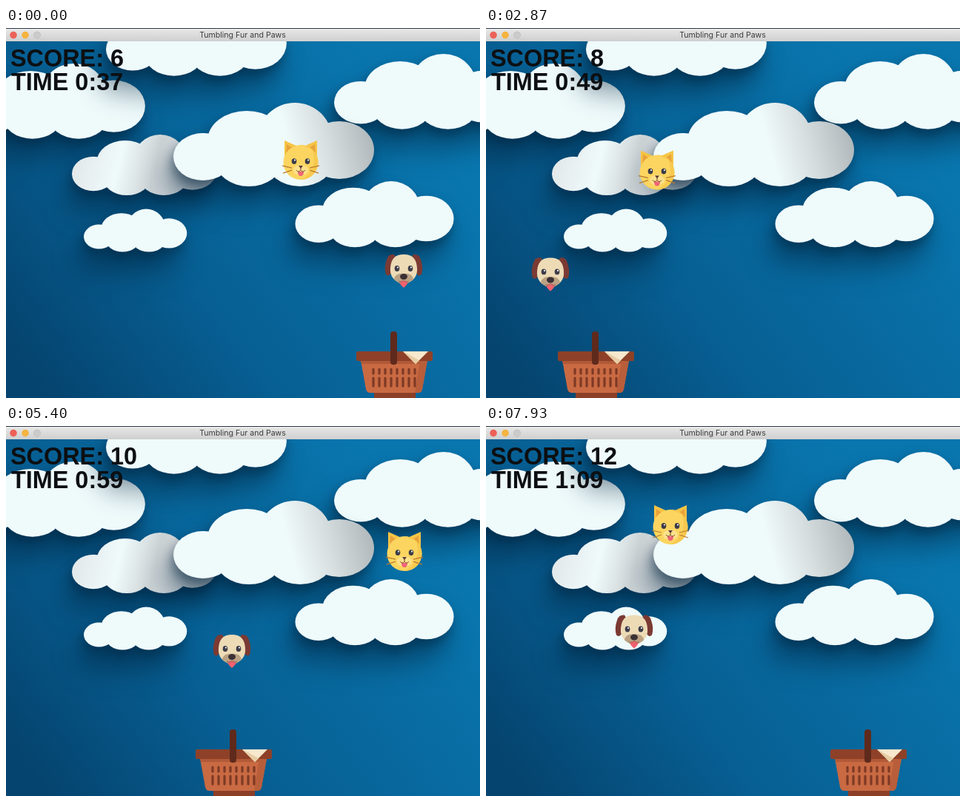
Recreate the animation shown at these times as an HTML page. Size 640 by 500 pixels, loop 8000 ms.

```html
<!DOCTYPE html>
<html lang="en">
<head>
<meta charset="utf-8">
<title>Tumbling Fur and Paws</title>
<style>
  html, body { margin: 0; width: 100%; height: 100%; overflow: hidden; background: #075689; }
  svg { display: block; width: 100vw; height: 100vh; }
  .hud { font: bold 32.4px "Liberation Sans", Arial, sans-serif; fill: #0d0f12; }
  .title { font: 10.6px Inter, Roboto, sans-serif; fill: #3c3c3c; text-anchor: middle; }
</style>
</head>
<body>
<svg viewBox="0 0 640 500" preserveAspectRatio="none">
  <defs>
    <linearGradient id="sky" gradientUnits="userSpaceOnUse" x1="60" y1="500" x2="560" y2="130">
      <stop stop-color="#05446f"/>
      <stop offset=".4" stop-color="#075f93"/>
      <stop offset="1" stop-color="#0976ae"/>
    </linearGradient>
    <linearGradient id="bar" x2="0" y2="1">
      <stop stop-color="#e9e9e9"/>
      <stop offset="1" stop-color="#cfcfcf"/>
    </linearGradient>
    <linearGradient id="shadeBig" gradientUnits="userSpaceOnUse" x1="160" y1="72" x2="272" y2="42">
      <stop stop-color="#effafb"/>
      <stop offset=".45" stop-color="#d6dddf"/>
      <stop offset="1" stop-color="#adb5b8"/>
    </linearGradient>
    <linearGradient id="shadeMid" gradientUnits="userSpaceOnUse" x1="10" y1="40" x2="200" y2="85">
      <stop stop-color="#e3e9eb"/>
      <stop offset=".4" stop-color="#effafb"/>
      <stop offset=".75" stop-color="#cdd4d6"/>
      <stop offset="1" stop-color="#d6dcdf"/>
    </linearGradient>
    <filter id="shadow" filterUnits="userSpaceOnUse" x="-100" y="-100" width="840" height="700" color-interpolation-filters="sRGB">
      <feDropShadow dx="-3" dy="8" stdDeviation="7" flood-color="#00213a" flood-opacity=".45"/>
      <feDropShadow dx="-9" dy="26" stdDeviation="17" flood-color="#00213a" flood-opacity=".48"/>
    </filter>
    <g id="cloud">
      <ellipse cx="40" cy="73" rx="40" ry="32"/>
      <ellipse cx="99" cy="51" rx="53" ry="40"/>
      <ellipse cx="164" cy="49" rx="50" ry="49"/>
      <ellipse cx="224" cy="64" rx="47" ry="39"/>
      <ellipse cx="102" cy="79" rx="45" ry="34"/>
      <ellipse cx="171" cy="77" rx="46" ry="36"/>
    </g>
  </defs>

  <rect width="640" height="500" fill="url(#sky)"/>
  <g id="clouds"></g>

  <g id="basket">
    <path d="M-27 491H29V500H-27Z" fill="#8c3f27"/>
    <path d="M-45 449H45L38 488Q37 493 32 493H-32Q-37 493-38 488Z" fill="#c96a43"/>
    <path d="M-45 449H45L44 454H-44Z" fill="#b25a38"/>
    <path d="M35 449H45L38 488Q37 493 32 493H28Z" fill="#b85e3b"/>
    <path id="slots" stroke="#7e3a25" stroke-width="3.2" stroke-linecap="round"/>
    <rect x="-51" y="437" width="103" height="13" rx="2" fill="#8e4128"/>
    <path d="M12 437H46L29 454Z" fill="#f8e8cd"/>
    <path d="M12 437L29 454L34 449Z" fill="#e7cda4"/>
    <rect x="-5" y="410" width="9" height="45" rx="4" fill="#5f2a1c"/>
  </g>

  <g id="cat">
    <path d="M-22 5L-22-27L-4-19ZM22 5L22-27L4-19Z" fill="#f6c445"/>
    <path d="M-20-7L-19-22L-10-16ZM20-7L19-22L10-16Z" fill="#e9a23b"/>
    <circle cy="2.5" r="23.5" fill="#fbd55f"/>
    <path d="M0-21A23.5 23.5 0 0 1 0 26A31 31 0 0 0 15-15Z" fill="#f7c94f"/>
    <ellipse cy="13" rx="10" ry="7" fill="#fde08a"/>
    <g class="eyes"></g>
    <path d="M-3 7H3L0 11Z" fill="#5b3a32"/>
    <path d="M-4 15H4Q4 21 0 21T-4 15Z" fill="#ee6578"/>
    <path d="M0 10V13M-6 13Q-3 17 0 13Q3 17 6 13" fill="none" stroke="#73492f"/>
    <path d="M-12 10L-25 7M-12 13L-24 17M12 10L25 7M12 13L24 17" stroke="#b9792d" stroke-width="1.2"/>
  </g>

  <g id="dog">
    <path d="M-13-22Q-21-23-23-15Q-27-4-24 5Q-20 9-16 2L-10-17ZM13-22Q21-23 23-15Q27-4 24 5Q20 9 16 2L10-17Z" fill="#7b3a33"/>
    <path d="M0-22C13-22 17-15 18-4C19 7 14 14 0 19C-14 14-19 7-18-4C-17-15-13-22 0-22Z" fill="#eddbb6"/>
    <path d="M0 4C9 3 13 8 13 12Q7 17 0 18Q-7 17-13 12C-13 8-9 3 0 4Z" fill="#bba283"/>
    <path d="M-6 15Q0 11 6 15Q5 19 0 23Q-5 19-6 15Z" fill="#f2616e"/>
    <path d="M-7 14Q-3 17 0 13Q3 17 7 14" fill="none" stroke="#8b7159"/>
    <g class="eyes" transform="translate(0 -4)"></g>
    <ellipse cy="8" rx="5" ry="4" fill="#3b3034"/>
  </g>

  <text id="score" class="hud" x="6" y="52"></text>
  <text id="clock" class="hud" x="7" y="84"></text>

  <rect width="640" height="18" fill="url(#bar)"/>
  <rect width="640" height="1" fill="#30384a"/>
  <circle cx="10" cy="9.6" r="4.8" fill="#ec6158"/>
  <circle cx="26" cy="9.6" r="4.8" fill="#f4b440"/>
  <circle cx="42" cy="9.6" r="4.6" fill="#cbcbcb" stroke="#b8b8b8" stroke-width=".6"/>
  <text class="title" x="319.5" y="13.3">Tumbling Fur and Paws</text>
</svg>

<script>
const LOOP = 8000, STEP = 1000 / 15;
const FALL_SPEED = .116, BASKET_SPEED = .24; // px per ms
const CATCH_Y = 385;
const byId = id => document.getElementById(id);

// x, y, scale, fill
const clouds = [
  [-56, 48, .9], [135, -37, .9], [443, 35, .9],
  [89, 144, .726, "url(#shadeMid)"], [226, 101, 1, "url(#shadeBig)"],
  [390.5, 207, .79], [105, 244.5, .514]
];
byId("clouds").innerHTML = clouds.map(([x, y, scale, fill = "#effafb"]) =>
  `<g filter="url(#shadow)"><use href="#cloud" fill="${fill}" transform="translate(${x} ${y}) scale(${scale})"/></g>`
).join("");

byId("slots").setAttribute("d", Array.from({ length: 8 }, (_, i) =>
  `M${i * 8 - 28} 461v6m0 6v11`).join(""));

for (const eyes of document.querySelectorAll(".eyes")) {
  eyes.innerHTML = [-9, 9].map(x =>
    `<ellipse cx="${x}" cy="1" rx="3.3" ry="3.9" fill="#3d3c49"/><circle cx="${x + 1}" cy="-.5" r="1.1" fill="#fff"/>`
  ).join("");
}

// Every animal falls down its lane and is replaced by the next once caught
const drops = {
  dog: [{ x: 537, caught: 491 }, { x: 87, caught: 3320 }, { x: 305, caught: 6098 }, { x: 200, caught: 8860 }],
  cat: [{ x: 398, caught: 1775 }, { x: 231, caught: 4525 }, { x: 538, caught: 7253 }, { x: 249, caught: 10097 }]
};
const allDrops = Object.values(drops).flat();

// The basket sets off at these times and glides to its next stop
const basketMoves = [
  { at: 491, to: 452 }, { at: 1600, to: 88 }, { at: 3390, to: 138 },
  { at: 4330, to: 307 }, { at: 6098, to: 554 }, { at: 7775, to: 200 }
];

function basketX(t) {
  return basketMoves.reduce((x, { at, to }) => {
    const reach = Math.max(0, t - at) * BASKET_SPEED;
    return x + Math.max(-reach, Math.min(reach, to - x));
  }, 524);
}

function place(id, x, y) {
  byId(id).setAttribute("transform", `translate(${x.toFixed(1)} ${y.toFixed(1)})`);
}

function draw(t) {
  for (const id in drops) {
    const { x, caught } = drops[id].find(d => t < d.caught);
    place(id, x, CATCH_Y - FALL_SPEED * (caught - t));
  }
  place("basket", basketX(t), 0);

  const seconds = Math.floor(37.7 + t / 247);
  byId("score").textContent = "SCORE: " + (6 + allDrops.filter(d => d.caught <= t).length);
  byId("clock").textContent =
    `TIME ${Math.floor(seconds / 60)}:${String(seconds % 60).padStart(2, "0")}`;
}

const start = performance.now();
function tick() {
  const t = Math.max(0, performance.now() - start) % LOOP;
  draw(Math.min(119, Math.floor((t + 4) / STEP)) * STEP);
  requestAnimationFrame(tick);
}
tick();
</script>
</body>
</html>
```
